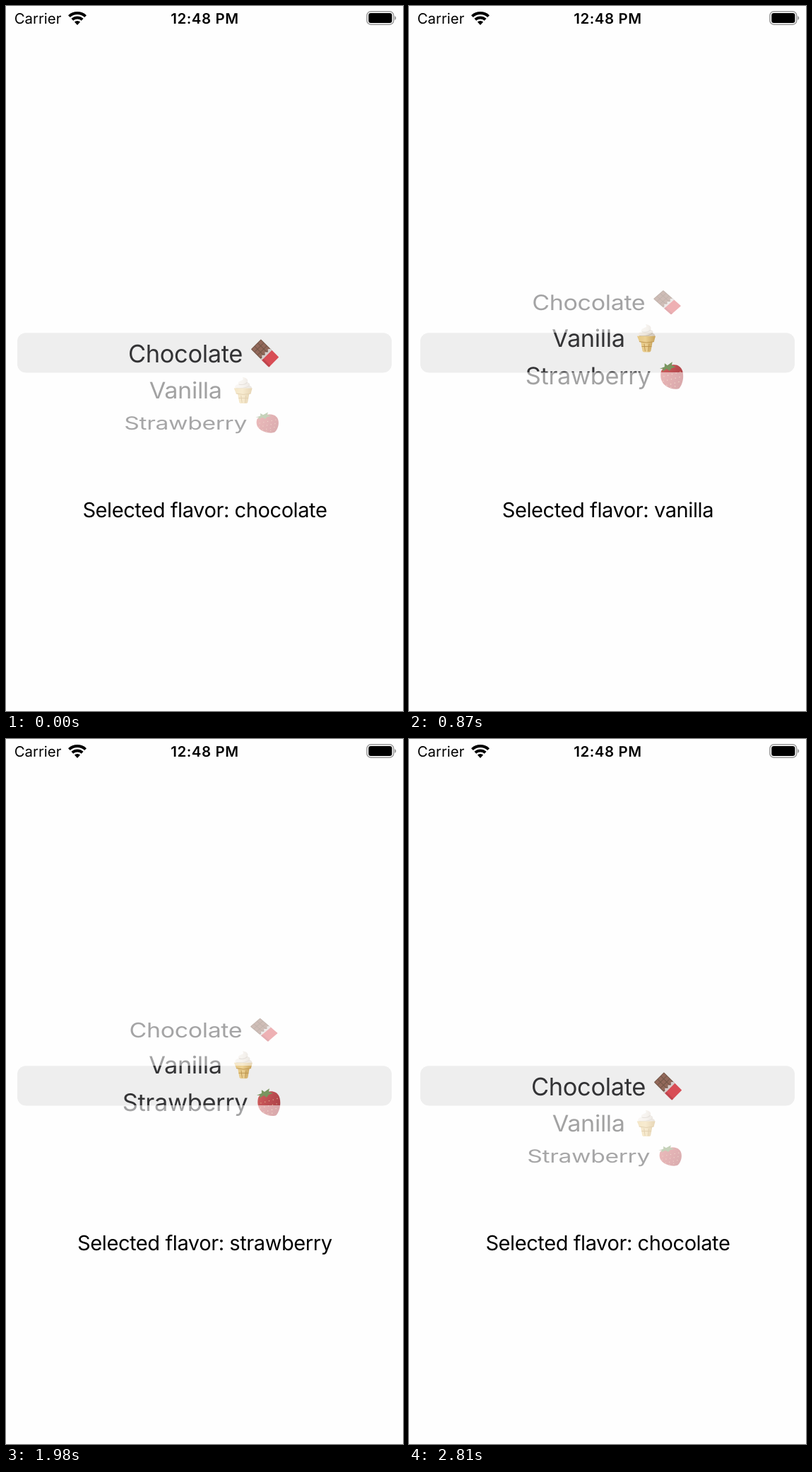
Write an HTML page that moves like this. It is 562 px wide and 997 px high and loops after 2.84 s.

```html
<!DOCTYPE html>
<html lang="en">
<head>
<meta charset="utf-8">
<title>Flavor picker</title>
<style>
  html, body { margin: 0; width: 100%; height: 100%; overflow: hidden; background: #fefefe; }
  svg { display: block; width: 562px; height: 997px; }
  text { font-family: Inter, sans-serif; font-optical-sizing: none; text-anchor: middle; text-rendering: geometricPrecision; }
  .status { font-size: 20.4px; }
  .clock { font-weight: 600; letter-spacing: .6px; }
  .row text { font-size: 34.4px; letter-spacing: -.33px; fill: #333335; }
  .row g { opacity: .87; }
  #label { font-size: 29px; letter-spacing: -.41px; }
</style>
</head>
<body>
<svg viewBox="0 0 562 997">
  <defs>
    <clipPath id="inside"><rect x="16" y="462" width="530" height="56"/></clipPath>
    <clipPath id="outside"><path d="M0 340H562V462H0ZM0 518H562V640H0Z"/></clipPath>
    <linearGradient id="berry" x1="0" x2="1" y2=".5">
      <stop stop-color="#cf4a4a"/><stop offset="1" stop-color="#a3282f"/>
    </linearGradient>
    <linearGradient id="wafer" x2="1">
      <stop stop-color="#e4c173"/><stop offset=".45" stop-color="#eccd88"/><stop offset="1" stop-color="#c39845"/>
    </linearGradient>
    <linearGradient id="cream" x2="1">
      <stop stop-color="#f2ece4"/><stop offset=".5" stop-color="#ebe3d8"/><stop offset="1" stop-color="#cabeb0"/>
    </linearGradient>

    <g id="wheel">
      <g class="row">
        <text x="-27" y="12.7">Chocolate</text>
        <g transform="translate(85.5 0) rotate(45)">
          <rect x="-18" y="-10" width="22" height="20" rx="1" fill="#61402f"/>
          <path d="M-14.5-9V9M-8.5-9V9M-2.5-9V9" stroke="#855545" stroke-width="5" stroke-dasharray="5.4 1"/>
          <path d="M1-10L-1-7L2-4L-1-1L2 2L-1 5L2 8L1 10H6V-10Z" fill="#d3c9c7"/>
          <path d="M4-10H17Q18-10 18-9V9Q18 10 17 10H4Z" fill="#d5363f"/>
          <path d="M4 7H18V9Q18 10 17 10H4Z" fill="#b92c36"/>
        </g>
      </g>
      <g class="row">
        <text x="-27" y="12.7">Vanilla</text>
        <g transform="translate(55 0)">
          <path d="M-11-1C-13-6-10-9-7-9C-8-13-4-14-2-15C1-16 0-18-1-20C5-19 8-16 6-12C10-11 10-8 9-7C13-6 13-2 11-1Z" fill="url(#cream)"/>
          <path d="M-6-9Q2-7 6-12M-10-3Q3-2 9-7" fill="none" stroke="#bfb3a5" stroke-width="1.2"/>
          <path d="M-8 4H9L6.5 18Q6 20 4 20H-3Q-5 20-5.5 18Z" fill="url(#wafer)"/>
          <path d="M-13-3H13L11 5Q0 8-10 5Z" fill="url(#wafer)"/>
          <path d="M-10 5Q0 8 11 5M-6.5 12H7.5M-3 8L-1.5 19M4 8L3 19" fill="none" stroke="#b88b3a" stroke-width="1"/>
        </g>
      </g>
      <g class="row">
        <text x="-27.5" y="12.7">Strawberry</text>
        <g transform="translate(91 0)">
          <path d="M-15-6C-17 3-14 11-8 15C-2 19 7 21 11 18C16 12 18 0 15-8C12-16 4-17-3-15C-8-14-13-11-15-6Z" fill="url(#berry)"/>
          <path d="M-11 1L14-6M-12 8L15 1M-7 14L13 8M-1 17L10 14" stroke="#dd9f7c" stroke-width="1.4" stroke-linecap="round" stroke-dasharray=".1 5.9"/>
          <path d="M-17-10L-10-13L-10-18L-6-15L1-20L0-15L6-13L0-11L-3-7L-7-10L-13-6L-12-10Z" fill="#68884a"/>
        </g>
      </g>
    </g>
  </defs>

  <rect width="562" height="997" fill="#fefefe"/>

  <text class="status" x="45" y="25.3">Carrier</text>
  <g fill="none" stroke="#000" stroke-width="4">
    <path d="M89.4 14.6A17 17 0 0 1 112.6 14.6"/>
    <path d="M93.8 19.25A10.6 10.6 0 0 1 108.2 19.25"/>
  </g>
  <path d="M101 27L96.9 22.6A6 6 0 0 1 105.1 22.6Z"/>
  <text class="status clock" x="281.4" y="25.3">12:48 PM</text>
  <rect x="510.9" y="7.8" width="37.8" height="18.4" rx="5.5" fill="none" stroke="#999" stroke-width="1.5"/>
  <rect x="513.2" y="10.1" width="33.2" height="13.8" rx="3.2"/>
  <path d="M550.2 14Q552.3 15 552.3 17T550.2 20Z" fill="#999"/>

  <rect x="16" y="462.3" width="530" height="56.2" rx="12" fill="#eee"/>
  <g clip-path="url(#outside)"><use href="#wheel" opacity=".45"/></g>
  <g clip-path="url(#inside)"><use href="#wheel"/></g>

  <text id="label" x="281.4" y="723"></text>
</svg>
<script>
  const LOOP = 2840;
  const MID = 491, RADIUS = 151, STEP = 20.3 * Math.PI / 180, DEPTH = 1550;
  const flavors = ["chocolate", "vanilla", "strawberry"];
  const rows = document.querySelectorAll(".row");
  const label = document.getElementById("label");

  // start time, wheel position, chosen flavor; each pose is held until the next
  const poses = [
    [0, 0, 0],
    [220, 0.4, 0], [320, 0.9, 0], [420, 1, 1],
    [870, 1.4, 1], [970, 1.9, 1], [1060, 2, 2],
    [1880, 1.97, 2], [1980, 1.57, 2], [2070, 1.1, 2], [2150, 1, 1],
    [2550, 0.933, 1], [2660, 0.5, 1], [2740, 0.09, 1], [2810, 0, 0]
  ];

  function placeRow(row, offset) {
    const angle = offset * STEP;
    const scale = 1 - RADIUS * (1 - Math.cos(angle)) / DEPTH;
    const y = MID + RADIUS * Math.sin(angle);
    row.setAttribute("transform",
      `translate(281 ${y}) scale(${scale} ${scale * Math.cos(angle)})`);
    row.setAttribute("opacity", 1 - 0.05 * Math.max(0, Math.abs(offset) - 1));
  }

  let shown = null;
  function show(time) {
    const pose = poses.findLast(p => p[0] <= time);
    if (pose === shown) return;
    shown = pose;
    rows.forEach((row, i) => placeRow(row, i - pose[1]));
    label.textContent = "Selected flavor: " + flavors[pose[2]];
  }

  const start = performance.now();
  function tick() {
    show((performance.now() - start) % LOOP);
    requestAnimationFrame(tick);
  }
  tick();
</script>
</body>
</html>
```
